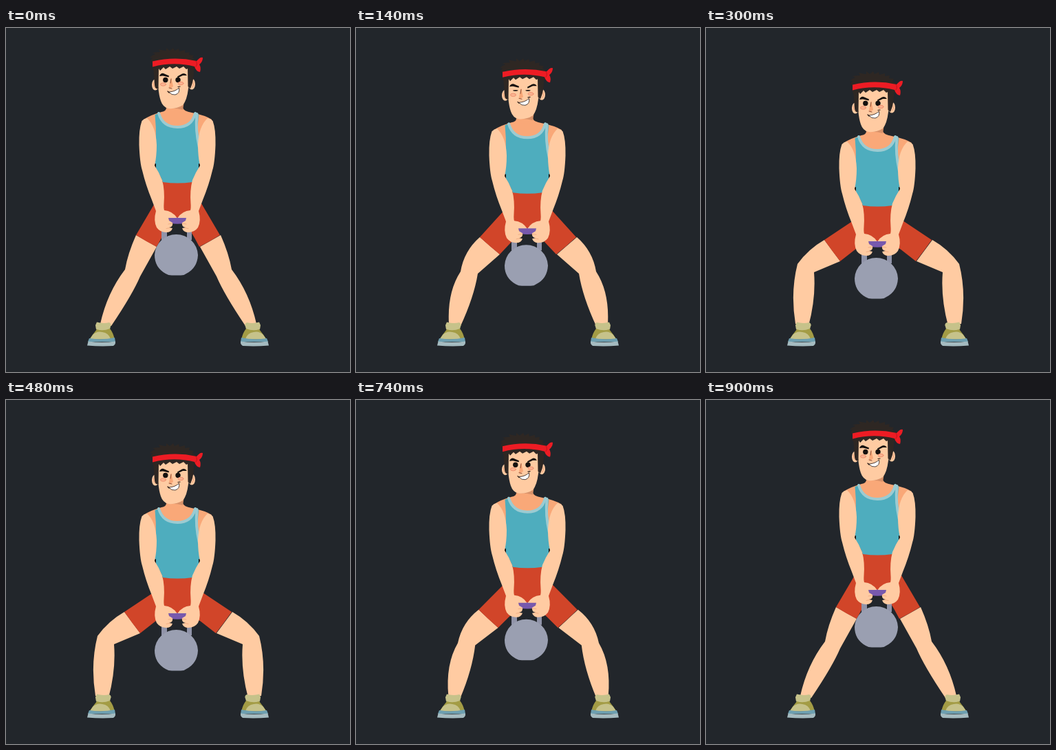
An HTML page for the animation above (0.92 s loop, 500 by 500 pixels).

```html
<!DOCTYPE html>
<html lang="en">
<head>
<meta charset="utf-8">
<title>Kettlebell squat</title>
<style>
  html, body { margin: 0; width: 100%; height: 100%; overflow: hidden; background: #22262b; }
  svg { display: block; width: 100vw; height: 100vh; }
  .skin { fill: #ffcba2; }
  .shade { fill: #f9a878; }
  .hair { fill: #2e2723; }
  .red { fill: #ed1c24; }
  .ink { fill: #15110f; }
  .line { fill: none; stroke-linecap: round; stroke-linejoin: round; }
</style>
</head>
<body>
<svg viewBox="0 0 500 500">
  <defs>
    <path id="leg" class="skin"/>
    <g id="shoe">
      <path fill="#c6c28a" d="M132 427.500Q141 430 150 428Q154 430 152 434L150 441H133Q130 437 130 432Z"/>
      <path fill="#a39c45" d="M132 438Q141 441 151 437Q156 443 158 453H121Q127 444 132 438Z"/>
      <path fill="#c6c28a" d="M126 446Q132 440 140 442Q149 443 152 452H122Z"/>
      <path fill="#6d9fb0" d="M121 451Q140 454 158 450L159 456H119Z"/>
      <path fill="#a5bbc0" d="M119.500 455.500Q140 458 159 455.500Q159.500 460 156 462Q137 463 118 461.500Z"/>
    </g>
    <g id="arm">
      <path class="ink" d="M213 198L218 197V206Z"/>
      <path class="skin" d="M205 131Q200 132 197.500 135Q193 147 193.500 170Q194.500 196 198 207Q203 228 212 250L218 266Q214 280 219 290Q224 297 233 297Q240 297 242 291L237 290Q243 289 242 283L237 280L236 276H248.500Q242 266 230 265Q229 262 229.500 255Q231 236 227 221Q222 209 216 200Q219 187 219 170Q218 143 205 131Z"/>
      <path class="line" stroke="#eda77c" stroke-width=".8" d="M233 291.500L238 290.500M236 285L242 284"/>
    </g>
  </defs>

  <use href="#leg"/>
  <use href="#leg" transform="matrix(-1 0 0 1 501 0)"/>
  <use href="#shoe"/>
  <use href="#shoe" transform="matrix(-1 0 0 1 500 0)"/>
  <path id="shorts" fill="#d14529"/>

  <g id="body">
    <!-- torso -->
    <path class="shade" d="M233 116H257Q258 121 270 123Q290 127 299 133L290 175H208L200 133Q211 126 226 122Q233 121 233 116Z"/>
    <path fill="#4eadbe" d="M216.500 126L222 124Q227 144 249 144Q271 144 275 124L280 126Q277 150 282 180Q284 193 283 203Q275 212 271 224Q249 227 228 224Q224 212 215 203Q220 160 216.500 126Z"/>
    <g class="line" stroke="#9bcbd2" stroke-width="4" stroke-linecap="butt">
      <path d="M222 124Q228 144 249 144Q270 144 275 124"/>
      <path d="M277.500 125Q275 148 281 174"/>
    </g>

    <!-- head -->
    <path class="shade" d="M233 108H257V122Q245 125 233 122Z"/>
    <path fill="#d9926a" d="M233 110L259 106L257 119Q247 116 233 117Z"/>
    <path class="hair" d="M214 52Q208 47 213 43L209 43Q213 39 217 38L213 36Q221 35 224 35L222 31Q230 33 233 33L233 29L238 33L243 29L245 33L251 30L252 34L260 32L260 36L267 35L266 39L273 40L271 43L276 47L275 60H213Z"/>
    <ellipse class="skin" cx="217" cy="82.500" rx="5" ry="8"/>
    <ellipse class="skin" cx="270" cy="81.500" rx="5" ry="8"/>
    <path class="line" stroke="#e79b75" d="M215 79Q213 84 217 87M272 78Q274 82 271 86"/>
    <path class="skin" d="M220 55H266Q268 78 265 88Q263 105 257 112Q248 118 236 117Q228 115 225 106Q220 92 220 55Z"/>
    <path class="hair" d="M214 56H222L221.500 88Q217 90 216 83ZM264 56H273Q274 75 268 88L264.500 85Z"/>
    <path class="hair" d="M214 52H275L271 63L266 58L262 60L258 56L252 59L248 56L242 59L238 56L232 60L229 57L224 62L222 59L217 65Z"/>
    <path class="red" d="M213 48.500Q245 41 277 48L280 45Q283 42 286 43Q286 49 281 53Q284 58 282 64Q276 63 274 56Q244 48.500 213 56.500Z"/>
    <path class="line" stroke="#b5121b" stroke-width=".8" d="M276 48Q279 52 276 56"/>

    <!-- face -->
    <path class="ink" d="M223 70Q225 65 229 66L237 69.500L236.500 71.500L228 69.500ZM249 70.500L256 66.500Q260 64.500 263 69L257 69L249.500 72.500Z"/>
    <g id="eyes" class="ink">
      <circle cx="231.800" cy="75.500" r="3.700"/>
      <circle cx="250" cy="75.500" r="3.700"/>
    </g>
    <g class="line" stroke="#f0906f" stroke-width="1">
      <ellipse fill="#fab491" cx="228.500" cy="82" rx="4" ry="2.200"/>
      <ellipse fill="#fab491" cx="254" cy="80.500" rx="4" ry="2.200"/>
    </g>
    <path class="shade" d="M240 72L243 85L238 88L237 85Z"/>
    <path class="line" stroke="#8c4d35" stroke-width="1" d="M240 74L239 80M237 87L241 88"/>
    <path fill="#fff" stroke="#251713" stroke-width=".8" d="M236.500 93Q246 92.500 251.500 87Q253 95 246 97Q241 98 236.500 93Z"/>
    <path class="line" stroke="#251713" stroke-width="1.200" d="M250 85.500L253 85M235 92L237 94"/>

    <!-- kettlebell -->
    <path fill="#9194a9" d="M226 282H234V308H226ZM263 282H270V308H263Z"/>
    <path fill="#7759ad" d="M235 275.500H264L260 283.500Q249 286 238.500 283.500Z"/>
    <path fill="#9a9fb1" d="M247.500 300A31.500 31 0 0 1 279 330Q278 349 262 357Q259 359.500 254 359.500H241Q236 359.500 232 357Q216 348 216 330A31.500 31 0 0 1 247.500 300Z"/>

    <use href="#arm"/>
    <use href="#arm" transform="matrix(-1 0 0 1 498 0)"/>
  </g>
</svg>
<script>
const LOOP = 920, STEP = 20, DEPTH = 34, MID = 0.45;
const el = id => document.getElementById(id);
const clamp = x => Math.min(1, Math.max(0, x));
const ease = x => { x = clamp(x); return x * x * (3 - 2 * x); };

// left leg joints: standing, halfway, full squat
const joints = {
  hemOut:    [[189, 301], [180, 304], [172, 308]],
  thigh:     [[177, 328], [157, 324], [149, 321]],
  kneeOut:   [[173, 351], [152, 354], [133, 343]],
  calfOut:   [[147, 385], [132.5, 384], [122.5, 384]],
  ankleOut:  [[137, 430], [135, 430], [130, 430]],
  ankleIn:   [[153, 433], [152, 433], [149, 433]],
  calfIn:    [[184, 387], [171.5, 391], [160, 392]],
  kneeIn:    [[195, 361], [177, 357], [157, 355]],
  hemIn:     [[219, 318], [209, 329], [195, 339]],
  groin:     [[226, 305], [224, 313], [218, 321]]
};

// parabola through the three poses
function pose([a, b, c], q) {
  const wa = (q - MID) * (q - 1) / MID;
  const wb = q * (q - 1) / (MID * (MID - 1));
  const wc = q * (q - MID) / (1 - MID);
  return a.map((v, i) => v * wa + b[i] * wb + c[i] * wc);
}

// eye opening for a blink of the given span
function blink(t, from, to) {
  const x = clamp((t - from) / (to - from));
  return 1 - 0.8 * Math.sin(Math.PI * x);
}

function draw(t) {
  const q = ease(t / 300) - ease((t - 600) / 300);
  const dy = DEPTH * q;
  const p = {};
  for (const k in joints) p[k] = pose(joints[k], q);

  el('body').setAttribute('transform', `translate(0 ${dy})`);
  el('leg').setAttribute('d',
    `M${p.hemOut}Q${p.thigh} ${p.kneeOut}Q${p.calfOut} ${p.ankleOut}` +
    `L${p.ankleIn}Q${p.calfIn} ${p.kneeIn}L${p.hemIn}Z`);

  const flip = ([x, y]) => [500 - x, y];
  const hem = [0, 1].map(i => (p.hemOut[i] + p.hemIn[i]) / 2 + i);
  el('shorts').setAttribute('d',
    `M228 ${220 + dy}L226 ${238 + dy}L${p.hemOut}Q${hem} ${p.hemIn}L${p.groin}` +
    `L240 ${281 + dy}H260L${flip(p.groin)}L${flip(p.hemIn)}` +
    `Q${flip(hem)} ${flip(p.hemOut)}L274 ${238 + dy}L272 ${220 + dy}Z`);

  const open = Math.min(blink(t, 70, 190), blink(t, 480, 600));
  el('eyes').setAttribute('transform', `translate(0 ${75.5 * (1 - open)}) scale(1 ${open})`);
}

const start = performance.now();
function tick() {
  const t = (performance.now() - start) % LOOP;
  draw(Math.floor(t / STEP) * STEP);
  requestAnimationFrame(tick);
}
tick();
</script>
</body>
</html>
```
